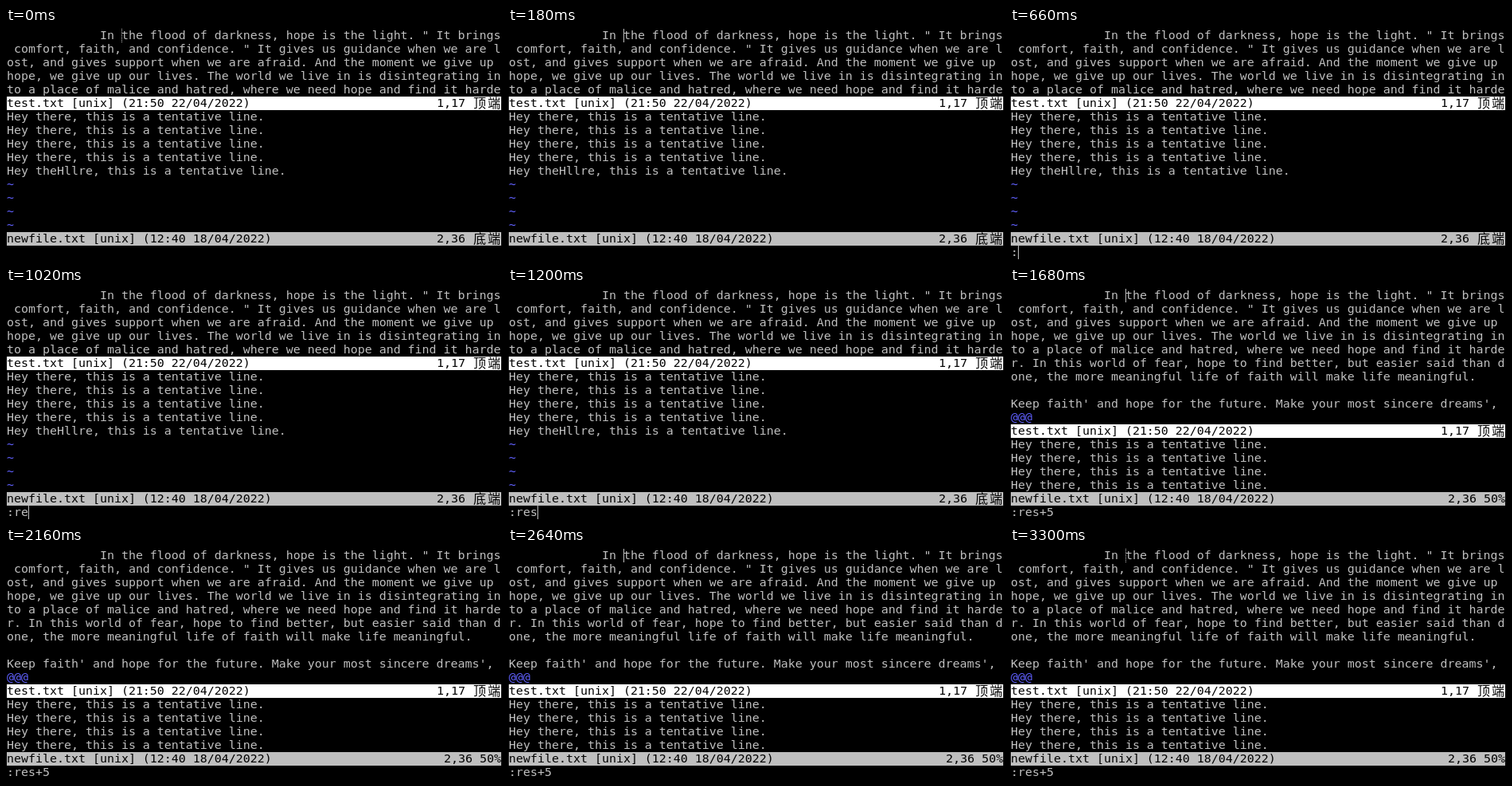
Write an HTML page that moves like this. It is 623 px wide and 291 px high and loops after 3.36 s.

```html
<!DOCTYPE html>
<html lang="en">
<head>
<meta charset="utf-8">
<title>Resizing a split window</title>
<style>
  html, body { margin: 0; width: 100%; height: 100%; overflow: hidden; background: #000; }
  svg { display: block; }
  text { font-family: "DejaVu Sans Mono", monospace; font-size: 14.95px; white-space: pre; }
  .wide { font-family: "Noto Sans CJK SC", "Noto Sans CJK", sans-serif; font-size: 16px; text-anchor: middle; }
</style>
</head>
<body>
<svg id="stage" width="623" height="291" viewBox="0 0 623 291"></svg>
<script>
const LOOP = 3360, CELL = 9, ROW = 17, PAD = 1, COLUMNS = 69;
const GREY = "#bfbfbf", WHITE = "#fff", BLACK = "#000", BLUE = "#6060ff";

const prose = [
  " ".repeat(13) + 'In the flood of darkness, hope is the light. " It brings',
  ' comfort, faith, and confidence. " It gives us guidance when we are l',
  "ost, and gives support when we are afraid. And the moment we give up",
  "hope, we give up our lives. The world we live in is disintegrating in",
  "to a place of malice and hatred, where we need hope and find it harde",
  "r. In this world of fear, hope to find better, but easier said than d",
  "one, the more meaningful life of faith will make life meaningful.",
  "",
  "Keep faith' and hope for the future. Make your most sincere dreams',"
];
const greeting = "Hey there, this is a tentative line.";
const typo = "Hey theHllre, this is a tentative line.";
const command = ":res+5";
const keyTimes = [660, 840, 1020, 1200, 1380, 1500];
const RESIZED = 1680;

const stage = document.getElementById("stage");
const colX = col => PAD + col * CELL;
const rowY = row => PAD + row * ROW;

function add(parent, tag, attributes, content = "") {
  const node = document.createElementNS("http://www.w3.org/2000/svg", tag);
  for (const key in attributes) node.setAttribute(key, attributes[key]);
  node.textContent = content;
  return parent.appendChild(node);
}

function write(parent, row, content, fill = GREY, col = 0) {
  return add(parent, "text", { x: colX(col), y: rowY(row) + 13, fill }, content);
}

function statusBar(parent, row, fill, title, position, wide = "") {
  add(parent, "rect", { x: PAD, y: rowY(row), width: COLUMNS * CELL, height: ROW, fill });
  write(parent, row, title, BLACK);
  const wideStart = COLUMNS - 2 * wide.length;
  const gap = wide ? 1 : 0;
  write(parent, row, position, BLACK, wideStart - gap - position.length);
  [...wide].forEach((char, i) => add(parent, "text", {
    class: "wide", x: colX(wideStart + 2 * i + 1), y: rowY(row) + 14, fill: BLACK
  }, char));
}

function layout(split, lower, fillers, lowerPosition, lowerWide) {
  const group = add(stage, "g", {});
  prose.slice(0, split).forEach((line, row) => write(group, row, line));
  if (split > prose.length) write(group, prose.length, "@@@", BLUE);
  statusBar(group, split, WHITE, "test.txt [unix] (21:50 22/04/2022)", "1,17", "顶端");
  lower.forEach((line, i) => write(group, split + 1 + i, line));
  for (let i = 0; i < fillers; i++) write(group, split + 1 + lower.length + i, "~", BLUE);
  statusBar(group, 15, GREY, "newfile.txt [unix] (12:40 18/04/2022)", lowerPosition, lowerWide);
  return group;
}

const four = Array(4).fill(greeting);
const before = layout(5, [...four, typo], 4, "2,36", "底端");
const after = layout(10, four, 0, "2,36 50%");
const prompt = write(stage, 16, "");
const cursor = add(stage, "path", { stroke: GREY, "stroke-width": 1 });

function placeCursor(col, row, style) {
  cursor.setAttribute("visibility", style === "off" ? "hidden" : "visible");
  cursor.setAttribute("d", `M${colX(col) + 0.5} ${rowY(row)}v${ROW}`);
  cursor.setAttribute("stroke-dasharray", style === "dotted" ? "1 1" : "none");
}

function editorCursor(t) {
  if (t < 180 || t >= 3300) return "dotted";
  return (t >= 2160 && t < 2640) || t >= 3180 ? "off" : "solid";
}

function draw(t) {
  const typed = keyTimes.filter(time => t >= time).length;
  const resized = t >= RESIZED;
  before.setAttribute("visibility", resized ? "hidden" : "visible");
  after.setAttribute("visibility", resized ? "visible" : "hidden");
  prompt.textContent = command.slice(0, typed);
  if (typed && !resized) placeCursor(typed, 16, "solid");
  else placeCursor(16, 0, editorCursor(t));
}

const start = performance.now();
function tick() {
  draw((performance.now() - start) % LOOP);
  requestAnimationFrame(tick);
}
tick();
</script>
</body>
</html>
```
